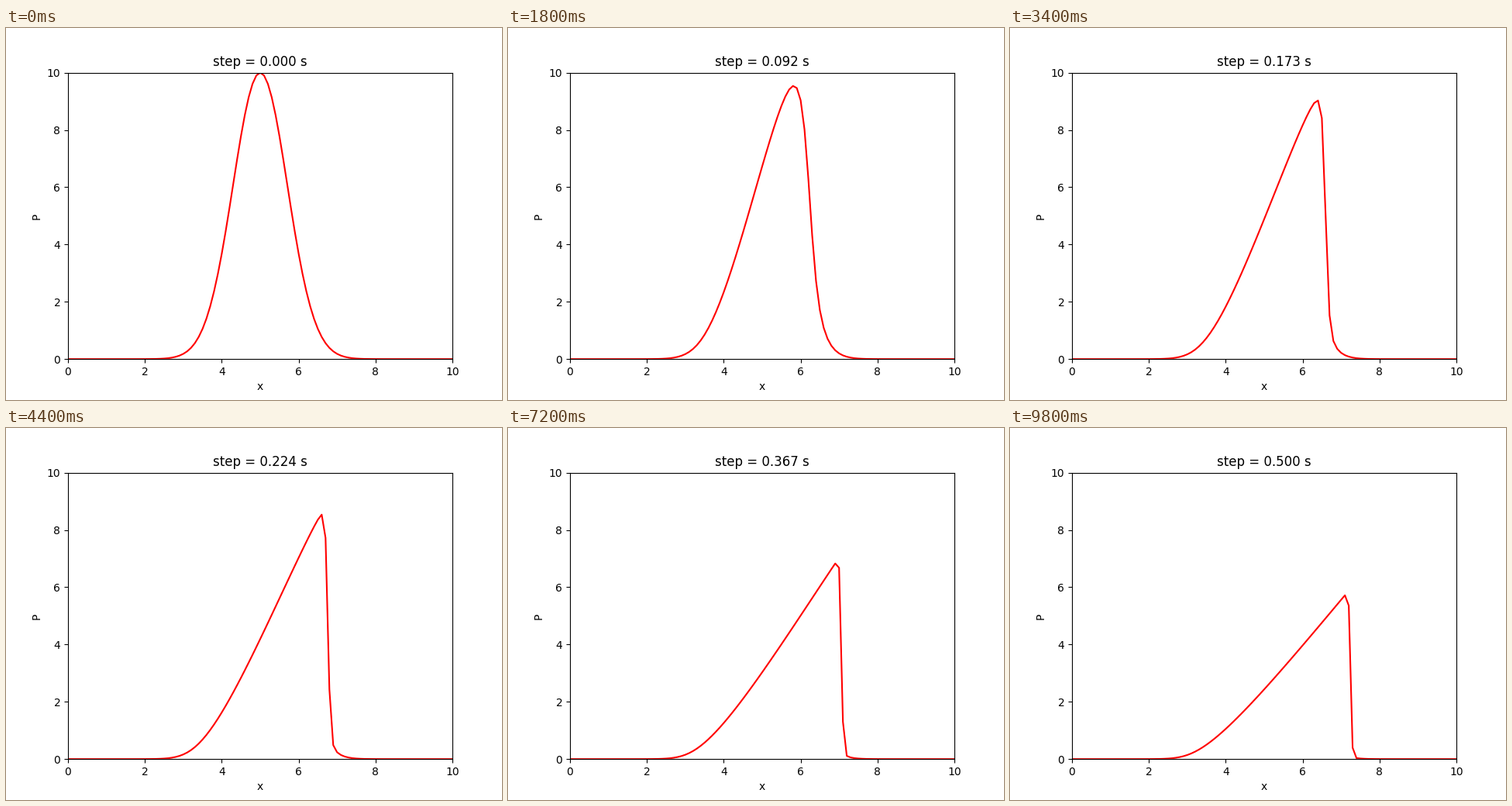
A matplotlib script for the animation above (10000 ms loop, 640 px wide and 480 px high).

```python
import numpy as np
import matplotlib.pyplot as plt
from matplotlib.animation import FuncAnimation

FRAMES = 50
INTERVAL = 200
T_END = 0.5
DX = 0.1
DT = 0.005
STEPS_PER_FRAME = 2

x = np.linspace(0, 10, 101)


def advance(p):
    """One explicit upwind step of p_t + p p_x = 0."""
    q = p.copy()
    q[1:] -= DT / DX * p[1:] * (p[1:] - p[:-1])
    return q


def solve():
    p = 10 * np.exp(-(x - 5) ** 2)
    states = [p]
    for _ in range(FRAMES - 1):
        for _ in range(STEPS_PER_FRAME):
            p = advance(p)
        states.append(p)
    return states


states = solve()
times = np.linspace(0, T_END, FRAMES)

fig, ax = plt.subplots(figsize=(6.4, 4.8), dpi=100)
ax.set_xlim(0, 10)
ax.set_ylim(0, 10)
ax.set_xlabel("x")
ax.set_ylabel("P")
line, = ax.plot(x, states[0], color="red", lw=1.5)
title = ax.set_title("")


def update(i):
    line.set_ydata(states[i])
    title.set_text(f"step = {times[i]:.3f} s")
    return line, title


anim = FuncAnimation(fig, update, frames=FRAMES, interval=INTERVAL,
                     init_func=lambda: update(0), repeat=True, repeat_delay=0)
plt.show()
```
